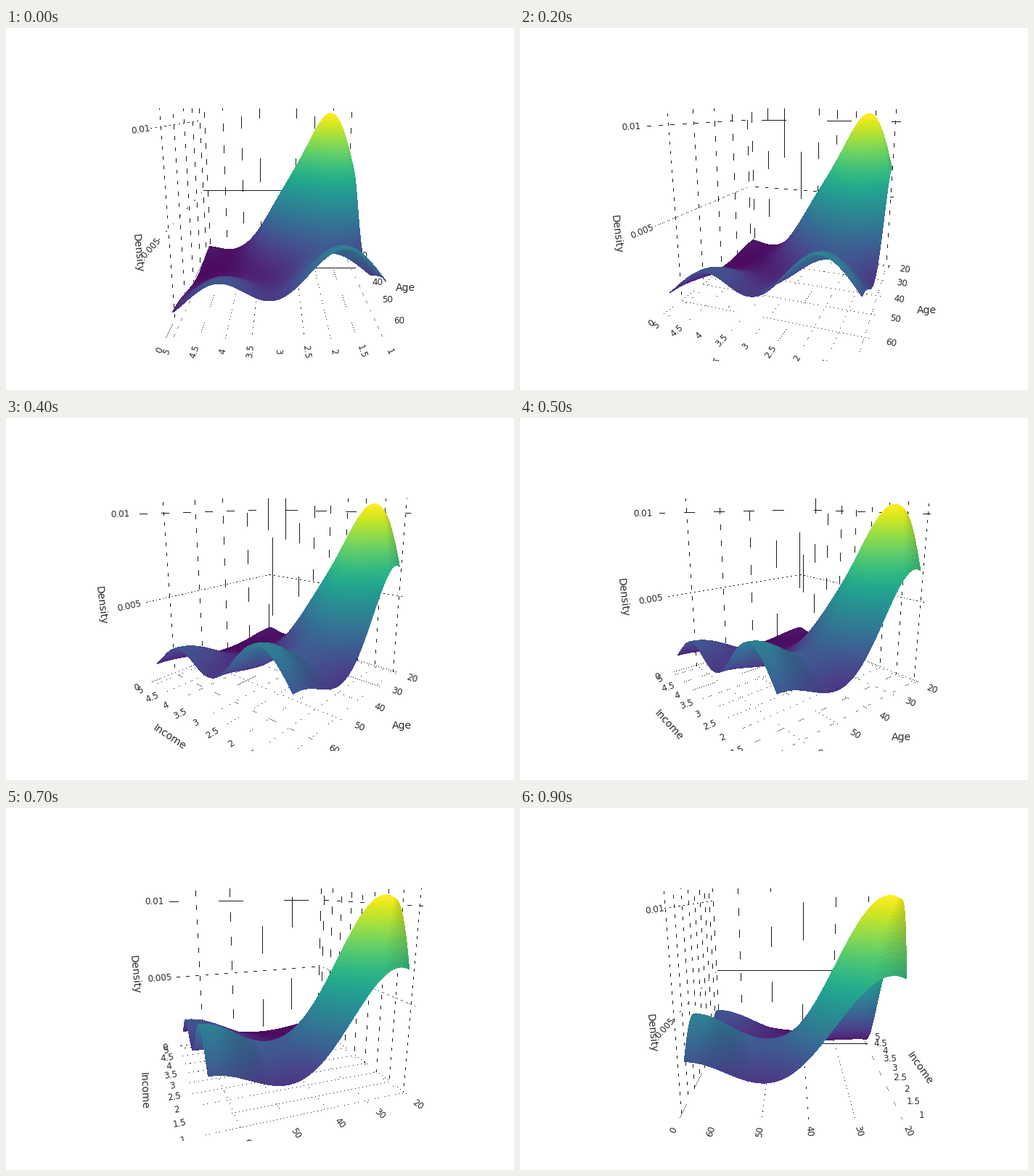
These frames come from a looping animation (700 by 500 pixels, 1000 ms). A matplotlib script:

```python
import numpy as np
import matplotlib.pyplot as plt
from matplotlib.animation import FuncAnimation
from matplotlib.collections import PolyCollection

WIDTH, HEIGHT, CLIP = 700, 500, 460
CX, CY, FOCAL = 375.0, 242.5, 525.1
RADIUS, EYE_Z = 2.0, 0.5
FRAMES, INTERVAL = 10, 100
PAD = 0.5 / 1.0625          # half-extent of the data inside the unit box
WALL_LINE, FLOOR_LINE = 0.38, 0.2   # thinner than a pixel, so slanted lines break up
INK = "#2a2a2a"

INCOMES = np.arange(1, 5.1, 0.5)
AGES = np.arange(20, 61, 10)
DENSITIES = np.array([0, 0.005, 0.01])


def income_pos(v):
    return (v - 3) / 4 * 2 * PAD


def age_pos(v):
    return (v - 43.5) / 47.9


def density_pos(v):
    return -0.0347 + (v - 0.005) * 91.8


def bell(x, centre, sigma):
    return np.exp(-((x - centre) ** 2) / (2 * sigma**2))


def density(i, a):
    young = (0.875 * bell(i, 0.12, 0.15) + 0.45 * bell(i, 0.41, 0.17)) * bell(a, 0.053, 0.265)
    old = 0.41 * bell(i, 0.19, 0.19) * bell(a, 1.0, 0.24)
    old_rich = 0.238 * bell(i, 0.78, 0.16) * bell(a, 1.0, 0.265)
    saddle = 0.06 * bell(i, 0.3, 0.13) * bell(a, 0.6, 0.15)
    corner = 0.05 * bell(i, 1.02, 0.1) * bell(a, 0, 0.2)
    return young + old + old_rich + saddle + corner


# Surface mesh in box coordinates
N = 150
t = np.linspace(0, 1, N)
I, A = np.meshgrid(t, t, indexing="ij")
H = density(I, A)
H /= H.max()
MESH = np.stack([I, A, H], axis=-1) * 2 * PAD - PAD


def cell_mean(g):
    return (g[:-1, :-1] + g[1:, :-1] + g[1:, 1:] + g[:-1, 1:]) / 4


# Light from above on the old-age side; only the steepest faces lose brightness
slope_i, slope_a = np.gradient(H, t, t)
lit = 0.5 * (1 - slope_a) / np.sqrt(1 + slope_i**2 + slope_a**2)
SHADE = np.clip(0.8 + 0.8 * cell_mean(lit).ravel(), 0.8, 1)
BASE = plt.get_cmap("viridis")(cell_mean(H).ravel())[:, :3]
COLOUR = np.clip(BASE * SHADE[:, None] + 0.02, 0, 1)
CENTRE = cell_mean(MESH).reshape(-1, 3)


class Camera:
    def __init__(self, degrees):
        th = np.radians(degrees)
        self.eye = np.array([RADIUS * np.cos(th), RADIUS * np.sin(th), EYE_Z])
        forward = -self.eye / np.linalg.norm(self.eye)
        right = np.array([-np.sin(th), np.cos(th), 0])
        self.basis = np.stack([right, np.cross(forward, right), forward])

    def project(self, p):
        x, y, depth = np.moveaxis((np.asarray(p) - self.eye) @ self.basis.T, -1, 0)
        return np.stack([CX + FOCAL * x / depth, CY + FOCAL * y / depth], axis=-1)

    def screen_angle(self, p, axis):
        """Readable text angle of a box axis as seen at point p."""
        step = np.zeros(3)
        step[axis] = 0.01
        dx, dy = self.project(p + step) - self.project(p - step)
        angle = np.degrees(np.arctan2(-dy, dx))
        return (angle + 90) % 180 - 90


def draw_line(mask, p, q, width):
    """Mark only the pixels that the thin line covers well."""
    main = int(abs(q[1] - p[1]) > abs(q[0] - p[0]))
    if p[main] > q[main]:
        p, q = q, p
    along = np.arange(int(np.ceil(p[main] - 0.5)), int(np.floor(q[main] - 0.5)) + 1)
    slope = (q[1 - main] - p[1 - main]) / (q[main] - p[main])
    across = p[1 - main] + slope * (along + 0.5 - p[main])
    cell = np.floor(across).astype(int)
    hit = np.abs(across - cell - 0.5) < width / 2 * (1 - 0.7 * abs(slope))
    col, row = (cell, along) if main else (along, cell)
    hit &= (col >= 0) & (col < WIDTH) & (row >= 0) & (row < CLIP)
    mask[row[hit], col[hit]] = 1


def grid_mask(cam, wall_y):
    mask = np.zeros((CLIP, WIDTH))
    xs, ys, zs = income_pos(INCOMES), age_pos(AGES), density_pos(DENSITIES)
    e = 0.5
    floor = [((x, -e, -e), (x, e, -e)) for x in xs]
    floor += [((-e, y, -e), (e, y, -e)) for y in ys]
    walls = [((x, wall_y, -e), (x, wall_y, e)) for x in xs]
    walls += [((e, y, -e), (e, y, e)) for y in ys]
    for z in zs:
        walls += [((-e, wall_y, z), (e, wall_y, z)), ((e, -e, z), (e, e, z))]
    for lines, width in ((floor, FLOOR_LINE), (walls, WALL_LINE)):
        for p, q in lines:
            draw_line(mask, cam.project(p), cam.project(q), width)
    return mask


def axis_labels(cam, wall_y):
    """Yield position and angle for every tick label, then every title."""
    side = -np.sign(wall_y)

    def income_at(x, off):
        return np.array([x, side * (0.5 + off), -0.5])

    def age_at(y, off):
        return np.array([-0.5 - off, y, -0.5])

    def density_at(z, off):
        if side > 0:
            return np.array([0.5, 0.5 + off, z])
        return np.array([-0.5 - off, 0.5, z])

    tick, title = 0.087, 0.23
    density_axis = 1 if side > 0 else 0
    groups = [(income_at, income_pos(INCOMES), 1),
              (age_at, age_pos(AGES), 0),
              (density_at, density_pos(DENSITIES), density_axis)]
    for place, values, axis in groups:
        for v in values:
            p = place(v, tick)
            yield cam.project(p), cam.screen_angle(p, axis)
    for (place, _, _), axis in zip(groups, (0, None, 2)):
        p = place(0, title)
        yield cam.project(p), 0 if axis is None else cam.screen_angle(p, axis)


fig = plt.figure(figsize=(WIDTH / 100, HEIGHT / 100), dpi=100, facecolor="white")
ax = fig.add_axes([0, 1 - CLIP / HEIGHT, 1, CLIP / HEIGHT])
grid = ax.imshow(np.zeros((CLIP, WIDTH, 4)), extent=(0, WIDTH, CLIP, 0),
                 interpolation="nearest", aspect="auto", zorder=1)
ax.set(xlim=(0, WIDTH), ylim=(CLIP, 0))
ax.axis("off")

surface = PolyCollection([], linewidths=0.3, antialiaseds=False, zorder=3)
ax.add_collection(surface, autolim=False)


def make_text(s, px):
    return ax.text(0, 0, s, fontsize=px * 0.72, family="DejaVu Sans", color=INK,
                   ha="center", va="center", clip_on=True, zorder=2)


texts = [make_text(f"{v:g}", 12) for v in (*INCOMES, *AGES, *DENSITIES)]
texts += [make_text(s, 14) for s in ("Income", "Age", "Density")]


def update(k):
    cam = Camera(90 + 10 * k)
    wall_y = 0.5 if k == FRAMES - 1 else -0.5

    rgba = np.full((CLIP, WIDTH, 4), 0.1)
    rgba[..., 3] = grid_mask(cam, wall_y)
    grid.set_data(rgba)

    for text, (pos, angle) in zip(texts, axis_labels(cam, wall_y)):
        text.set_position(pos)
        text.set_rotation(angle)

    # Paint the mesh cells from far to near
    xy = cam.project(MESH)
    quads = np.stack([xy[:-1, :-1], xy[1:, :-1], xy[1:, 1:], xy[:-1, 1:]], axis=2)
    to_eye = cam.eye - CENTRE
    order = np.argsort(-np.hypot(to_eye[:, 0], to_eye[:, 1]))
    surface.set_verts(quads.reshape(-1, 4, 2)[order])
    surface.set_facecolor(COLOUR[order])
    surface.set_edgecolor(COLOUR[order])
    return [grid, surface, *texts]


anim = FuncAnimation(fig, update, frames=FRAMES, interval=INTERVAL,
                     repeat=True, repeat_delay=0, blit=False)
plt.show()
```
